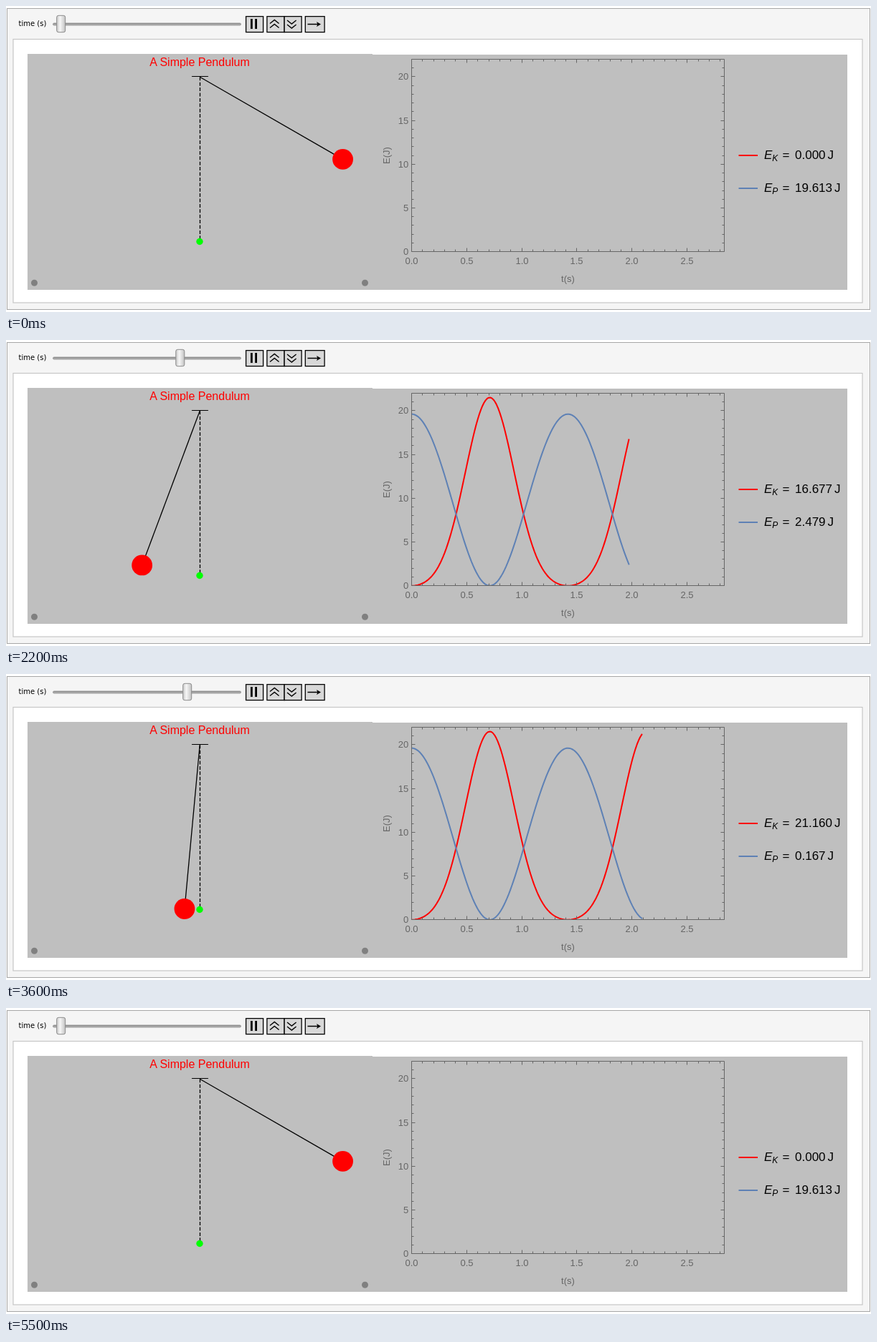
These frames come from a looping animation (1206x428 px, 6 s). An HTML page:

```html
<!DOCTYPE html>
<html lang="en">
<head>
<meta charset="utf-8">
<title>A Simple Pendulum</title>
<style>
  html, body { margin: 0; width: 100%; height: 100%; overflow: hidden; background: #fff; }
  svg { display: block; width: 1206px; height: 428px; font-family: "Liberation Sans", Arial, sans-serif; }
  .label { font-size: 13px; fill: #666; }
  .legend { font-size: 17px; }
  .sub { font-size: 12px; }
  .it { font-style: italic; }
  .curve { fill: none; stroke-width: 2; stroke-linecap: square; stroke-linejoin: round; }
</style>
</head>
<body>
<svg viewBox="0 0 1206 428" xmlns="http://www.w3.org/2000/svg">
  <defs>
    <linearGradient id="knob">
      <stop offset="0" stop-color="#c9c9c9"/>
      <stop offset=".4" stop-color="#f6f6f6"/>
      <stop offset="1" stop-color="#c2c2c2"/>
    </linearGradient>
    <linearGradient id="rail" x2="0" y2="1">
      <stop offset="0" stop-color="#858585"/>
      <stop offset="1" stop-color="#c4c4c4"/>
    </linearGradient>
    <clipPath id="area"><rect x="565" y="74" width="437" height="270"/></clipPath>
  </defs>

  <rect x="1.5" y="3.5" width="1203" height="421" fill="#f5f5f5" stroke="#a6a6a6"/>
  <rect x="10" y="46.5" width="1184" height="368.5" fill="#fff" stroke="#c6c6c6" stroke-width="1.2"/>

  <!-- controls -->
  <text x="17.5" y="28" font-size="10" style="font-family:'DejaVu Sans',sans-serif">time (s)</text>
  <rect x="65.5" y="24" width="262" height="3" rx="1.5" fill="url(#rail)" stroke="#8c8c8c" stroke-width=".8"/>
  <g id="thumb">
    <rect x="-6" y="13.3" width="12" height="23.4" rx="2.5" fill="url(#knob)" stroke="#8a8a8a"/>
  </g>
  <g fill="#d8d8d8" stroke="#000" stroke-width="1.3">
    <rect x="334.6" y="14.6" width="24" height="22"/>
    <rect x="363.9" y="14.6" width="24.2" height="22"/>
    <rect x="388.1" y="14.6" width="24" height="22"/>
    <rect x="417.3" y="14.6" width="26.8" height="22"/>
  </g>
  <path d="M341 18h2.8v14h-2.8zM347.2 18h2.8v14h-2.8z"/>
  <path d="M368 24.5l6.3-5 6.3 5M368 30.5l6.3-5 6.3 5M392 20l6.3 5 6.3-5M392 26l6.3 5 6.3-5M420.5 25.5H437"
        fill="none" stroke="#000" stroke-width="1.4"/>
  <path d="M439 25.5l-6-3.4 1.4 3.4-1.4 3.4z"/>

  <!-- pendulum -->
  <path d="M30 67H511V68H1173V397H30z" fill="#bfbfbf"/>
  <text x="270" y="84" font-size="16" fill="#f00" text-anchor="middle">A Simple Pendulum</text>
  <g fill="#808080"><circle cx="39.5" cy="387.3" r="4.5"/><circle cx="500.5" cy="387.3" r="4.5"/></g>
  <path d="M259 98.5H282" stroke="#000"/>
  <path d="M270.5 99.3V329.5" stroke="#000" stroke-width="1.3" stroke-dasharray="5 2.4"/>
  <circle cx="270" cy="329.5" r="4.7" fill="#0f0"/>
  <line id="rod" x1="270.2" y1="99.3" stroke="#000" stroke-width="1.3"/>
  <circle id="bob" r="14.4" fill="#f00"/>

  <!-- chart -->
  <g clip-path="url(#area)">
    <path id="kinetic" class="curve" stroke="#f00"/>
    <path id="potential" class="curve" stroke="#5e81b5"/>
  </g>
  <path id="axes" fill="none" stroke="#666"/>
  <g id="labels" class="label"></g>
  <text class="label" x="783.5" y="386" text-anchor="middle">t(s)</text>
  <text class="label" transform="translate(535 209) rotate(-90)" text-anchor="middle">E(J)</text>

  <path d="M1021.5 209H1048" stroke="#f00" stroke-width="2"/>
  <path d="M1021.5 255H1048" stroke="#5e81b5" stroke-width="2"/>
  <g class="legend">
    <text x="1057" y="214" class="it">E</text><text x="1068.2" y="217" class="it sub">K</text>
    <text x="1082.6" y="214">=</text>
    <text x="1100" y="214"><tspan id="ekText"></tspan><tspan dx="3">J</tspan></text>
    <text x="1057" y="260" class="it">E</text><text x="1068.2" y="263" class="it sub">P</text>
    <text x="1082.6" y="260">=</text>
    <text x="1100" y="260"><tspan id="epText"></tspan><tspan dx="3">J</tspan></text>
  </g>
</svg>
<script>
const $ = id => document.getElementById(id);
const set = (id, attrs) => { for (const k in attrs) $(id).setAttribute(k, attrs[k]); };

const LOOP = 6000, STEP = 100;
const G = 9.80665, MASS = 2, LEN = 2, SWING = Math.PI / 3;
const OMEGA = Math.sqrt(G / LEN);
const T_MAX = 2.8375, RATE = 0.00115424, TURN = 2950.86;
const PIVOT = { x: 270.2, y: 99.3 }, ROD = 230.2;
const BOX = { l: 565.5, r: 1001.5, t: 74.5, b: 343.5 };

const px = t => BOX.l + 153.66 * t;
const py = e => 343.7 - 12.24 * e;
const angle = t => SWING * Math.cos(OMEGA * t);
const potential = t => MASS * G * LEN * (1 - Math.cos(angle(t)));
// Only the horizontal velocity counts here.
const kinetic = t => {
  const vx = LEN * SWING * OMEGA * Math.sin(OMEGA * t) * Math.cos(angle(t));
  return MASS * vx * vx / 2;
};

function drawAxes() {
  const { l, r, t, b } = BOX;
  const snap = v => Math.floor(v) + 0.5;
  let d = `M${l} ${t}H${r}V${b}H${l}Z`, text = "";
  for (let i = 0; i <= 28; i++) {
    const x = snap(px(i / 10)), major = i % 5 === 0, n = major ? 5 : 3;
    d += `M${x} ${b}v${-n}M${x} ${t}v${n}`;
    if (major) text += `<text x="${x}" y="361" text-anchor="middle">${(i / 10).toFixed(1)}</text>`;
  }
  for (let i = 0; i <= 21; i++) {
    const y = snap(py(i)), major = i % 5 === 0, n = major ? 5 : 3;
    d += `M${l} ${y}h${n}M${r} ${y}h${-n}`;
    if (major) text += `<text x="561.3" y="${y + 4.5}" text-anchor="end">${i}</text>`;
  }
  set("axes", { d });
  $("labels").innerHTML = text;
}

function curve(f, end) {
  if (end <= 0) return "";
  const n = Math.max(2, Math.ceil(end * 70));
  let d = "";
  for (let i = 0; i <= n; i++) {
    const t = end * i / n;
    d += (i ? "L" : "M") + px(t).toFixed(2) + " " + py(f(t)).toFixed(2);
  }
  return d;
}

function draw(ms) {
  const clock = Math.floor(ms / STEP) * STEP;
  const t = Math.max(0, T_MAX - RATE * Math.abs(clock - TURN));
  const a = angle(t);
  const x = PIVOT.x + ROD * Math.sin(a), y = PIVOT.y + ROD * Math.cos(a);
  set("thumb", { transform: `translate(${(76.7 + 84.3 * t).toFixed(1)} 0)` });
  set("rod", { x2: x, y2: y });
  set("bob", { cx: x, cy: y });
  set("kinetic", { d: curve(kinetic, t) });
  set("potential", { d: curve(potential, t) });
  $("ekText").textContent = kinetic(t).toFixed(3);
  $("epText").textContent = potential(t).toFixed(3);
}

drawAxes();
draw(0);
const start = performance.now();
(function tick() {
  draw((performance.now() - start) % LOOP);
  requestAnimationFrame(tick);
})();
</script>
</body>
</html>
```
